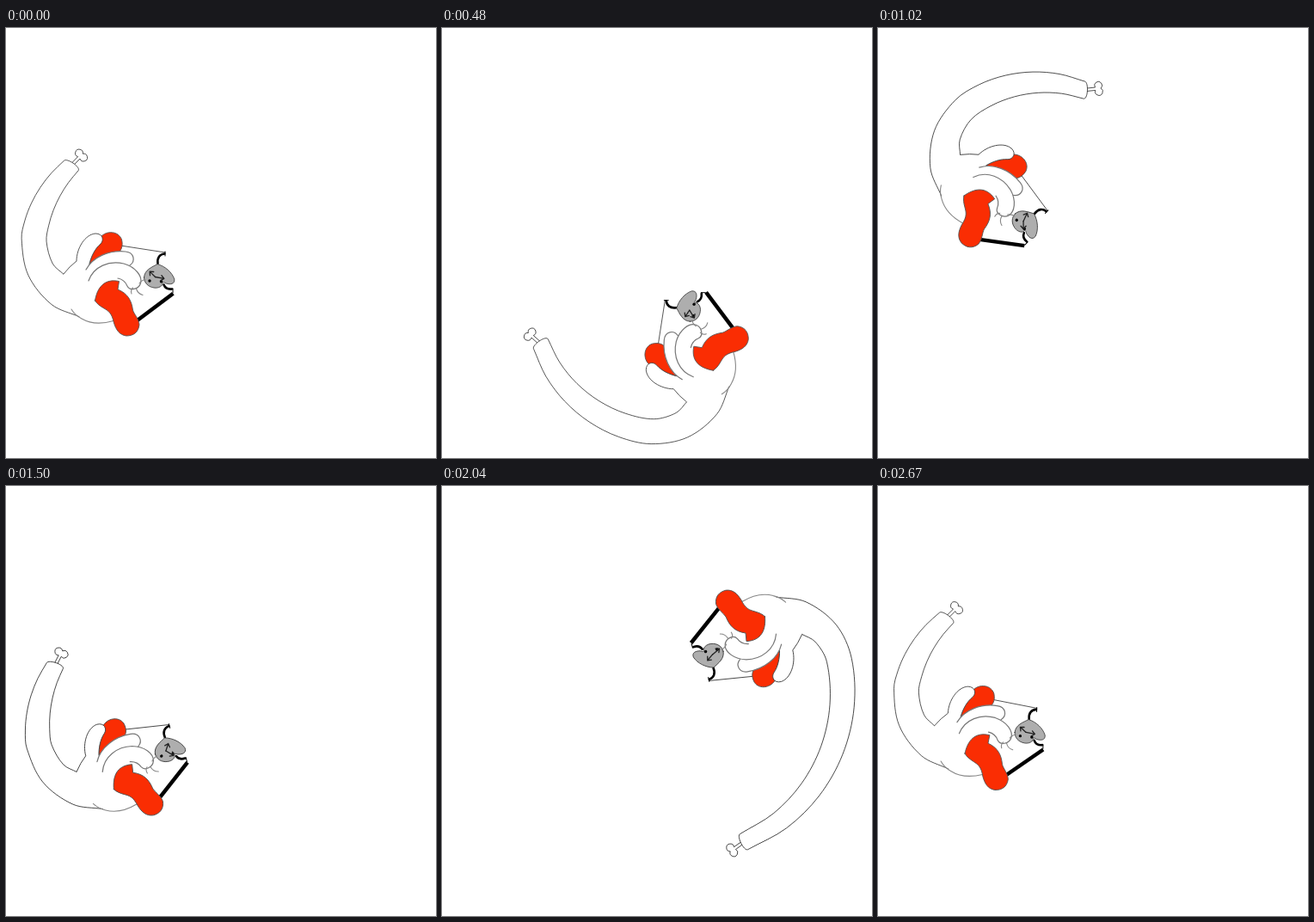
Animation of 500x500 px, one loop 2.7 s. Source, as an HTML page:

```html
<!DOCTYPE html>
<html lang="en">
<head>
<meta charset="utf-8">
<title>Spinning arm</title>
<style>
  html, body { margin: 0; width: 100%; height: 100%; overflow: hidden; background: #fff; }
  svg { display: block; width: 100%; height: 100%; }
  path { stroke-linecap: round; stroke-linejoin: round; }
  .edge { fill: #fff; stroke: #111; stroke-width: .7; }
  .soft { fill: #fff; stroke: #777; stroke-width: 1.2; }
  .line { fill: none; stroke: #888; stroke-width: 1.1; }
  .red { fill: #fa2d03; stroke: #555; stroke-width: .9; }
  .thick { fill: none; stroke: #000; }
  .tick { fill: none; stroke: #222; stroke-width: 1.3; }
</style>
</head>
<body>
<svg viewBox="0 0 500 500">
  <g id="rig">
    <!-- card -->
    <path fill="#fff" d="M130 252.500L185 261L176 274L182 297L194 306L153 340L120 320Z"/>
    <path class="edge" d="M130 252.500L185 261"/>
    <path class="thick" stroke-width="2.600" d="M184.300 262.500C179 263 175.500 267 176.500 274M183.500 298.500C185 302.500 188 304 193 303.500"/>
    <path class="thick" stroke-width="1" d="M185 260V265M194 303V308"/>
    <path class="thick" stroke-width="4.500" style="stroke-linecap:butt" d="M194.300 308.800L152 340.500"/>

    <!-- clock face -->
    <path fill="#aeaeae" stroke="#333" stroke-width=".8" d="M160.500 290C161 281 170 278 176 274.500C185 277 193 284 195.800 292C196.500 298 191 298.500 186 297C184 296 183 295 182 296C183 300 177 303 172 302C165 301 160.500 296 160.500 290Z"/>
    <circle cx="167" cy="294" r="1.700"/>
    <circle cx="180.500" cy="294.800" r="1.700"/>
    <path id="handA" class="tick" d="M0 0H9M5.500 -3L9 0L5.500 3"/>
    <path id="handB" class="tick" d="M0 0H10.500M7 -3L10.500 0L7 3"/>

    <path id="bone" class="edge" d="M1 -1.700H13A4.400 4.400 0 1 1 19.500 0A4.400 4.400 0 1 1 13 1.700H1"/>
    <path id="arm" class="edge"/>

    <!-- back of the hand -->
    <path fill="#fff" d="M67 286L82 271L98 272L140 277L132 296L126 341C112 346 98 343 85 335L66 320Z"/>
    <path class="line" d="M76 327C79 332 82 335 88 338C100 345 113 344 125 340.500"/>

    <!-- fingers -->
    <path class="red" d="M97 274C100 262 104 256 110 250L110 243C117 235 131 236 134.500 246C136.500 254 134 260 128 263C118 264 107 267 97 274Z"/>
    <path fill="#fff" d="M82 271C82 256 92 240 104 239C113 239 114 247 110 251C103 257 99 266 97 274L85 283Z"/>
    <path class="line" style="stroke:#444;stroke-width:.9" d="M67 286Q74 277 82 271C82 256 92 240 104 239C113 239 114 247 110 251C103 257 99 266 97 274"/>
    <path class="soft" d="M93 281C101 266 120 258 139 260C149 261 151 271 144 276"/>
    <path class="soft" d="M96 294C102 277 120 270 137 274C151 278 159 289 156.500 297C154 304 144 306 141 300C139 295 135 292 130 291"/>
    <path class="line" d="M146 309Q144.500 305 147.500 302M151.500 303Q153 309 159 310.500M155 297Q158 293 162 292.500"/>
    <path class="red" d="M103.500 317C106 302 114 291 131.500 294.500L130 304C142 309 146 317 147.500 328C149 333 154.500 338 155 345C154 354 148 358 140 358C132 357 128 351 125.500 343C123 331 119 329 114 326C109 323 106 321 103.500 317Z"/>
  </g>
</svg>
<script>
const CX = 250, CY = 251.7, LOOP = 1350, STEP = 30;
const $ = id => document.getElementById(id);

// time, turn, tip angle, tip radius, bone tilt, clock hand A, clock hand B
const KEYS = [
  [0, 0, 208, 207, 11, -135, 10],
  [150, -15, 207.7, 208, 9, -57, 46],
  [480, -90, 229.7, 188, -13, 214, 148],
  [690, -194.5, 252.8, 201, -9, 325, 154],
  [1020, -315.3, 222.3, 190, -8, 405, 250],
  [1080, -327.2, 215.2, 195.5, -12, 412, 287],
  [1320, -357.7, 207.9, 207, 10, 580, 369]
];
const GAIN = [LOOP, -360, 0, 0, 0, 720, 360]; // growth per loop

function key(i, c) {
  const n = KEYS.length, lap = Math.floor(i / n);
  return KEYS[i - lap * n][c] + lap * GAIN[c];
}

function slope(i, c) {
  const h0 = key(i, 0) - key(i - 1, 0), h1 = key(i + 1, 0) - key(i, 0);
  const d0 = (key(i, c) - key(i - 1, c)) / h0, d1 = (key(i + 1, c) - key(i, c)) / h1;
  return (h1 * d0 + h0 * d1) / (h0 + h1);
}

function track(t, c) {
  let i = 0;
  while (key(i + 1, 0) <= t) i++;
  const h = key(i + 1, 0) - key(i, 0), s = (t - key(i, 0)) / h, q = 1 - s;
  return key(i, c) * q * q * (1 + 2 * s) + key(i + 1, c) * s * s * (3 - 2 * s)
    + h * s * q * (slope(i, c) * q - slope(i + 1, c) * s);
}

const polar = ([a, r]) => {
  const k = a * Math.PI / 180;
  return [CX + r * Math.cos(k), CY + r * Math.sin(k)];
};

// fixed root followed by a part that bends towards the tip
function side(root, a, r) {
  const [a0, r0] = root[root.length - 1];
  const bend = [.2, .4, .6, .8, 1].map(f => [a0 + (a - a0) * f, r0 + (r - r0) * f ** 1.5]);
  return root.concat(bend).map(polar);
}

const pt = p => p[0].toFixed(2) + ' ' + p[1].toFixed(2);
const gap = (a, b) => Math.hypot(b[0] - a[0], b[1] - a[1]);

// curve through the points, tangents scaled to the length of each span
function smooth(pts) {
  const tangent = i => {
    const p = pts[i], a = pts[i - 1] || p, b = pts[i + 1] || p;
    const n = gap(a, p) + gap(p, b);
    return [(b[0] - a[0]) / n, (b[1] - a[1]) / n];
  };
  const lean = (i, k) => {
    const u = tangent(i);
    return [pts[i][0] + u[0] * k, pts[i][1] + u[1] * k];
  };
  let d = '';
  for (let i = 0; i < pts.length - 1; i++) {
    const k = gap(pts[i], pts[i + 1]) / 3;
    d += `C${pt(lean(i, k))} ${pt(lean(i + 1, -k))} ${pt(pts[i + 1])}`;
  }
  return d;
}

const OUTER = [[153, 185], [160.5, 209], [171, 227], [181.7, 232]];
const INNER = [[169.2, 186], [173.5, 197], [181, 203]];

function draw(time) {
  const t = Math.floor(time / STEP) * STEP % LOOP;
  const [turn, tipA, tipR, tilt, handA, handB] = [1, 2, 3, 4, 5, 6].map(c => track(t, c));

  const outer = side(OUTER, tipA, tipR);
  const inner = side(INNER, tipA - .6, tipR - 20.2).reverse();
  const p = outer[outer.length - 1], q = inner[0];
  const dx = q[1] - p[1], dy = p[0] - q[0];
  const out = v => [v[0] + dx * .25, v[1] + dy * .25];

  $('arm').setAttribute('d',
    `M${pt(outer[0])}${smooth(outer)}C${pt(out(p))} ${pt(out(q))} ${pt(q)}${smooth(inner)}`);
  const axis = Math.atan2(dy, dx) * 180 / Math.PI + tilt;
  $('bone').setAttribute('transform',
    `translate(${(p[0] + q[0]) / 2} ${(p[1] + q[1]) / 2}) rotate(${axis})`);
  $('handA').setAttribute('transform', `translate(173.500 289.500) rotate(${handA})`);
  $('handB').setAttribute('transform', `translate(173.500 289.500) rotate(${handB})`);
  $('rig').setAttribute('transform', `rotate(${turn} ${CX} ${CY})`);
}

let start;
function tick(now) {
  if (start === undefined) start = now;
  draw(Math.max(0, now - start));
  requestAnimationFrame(tick);
}
draw(0);
requestAnimationFrame(tick);
</script>
</body>
</html>
```
